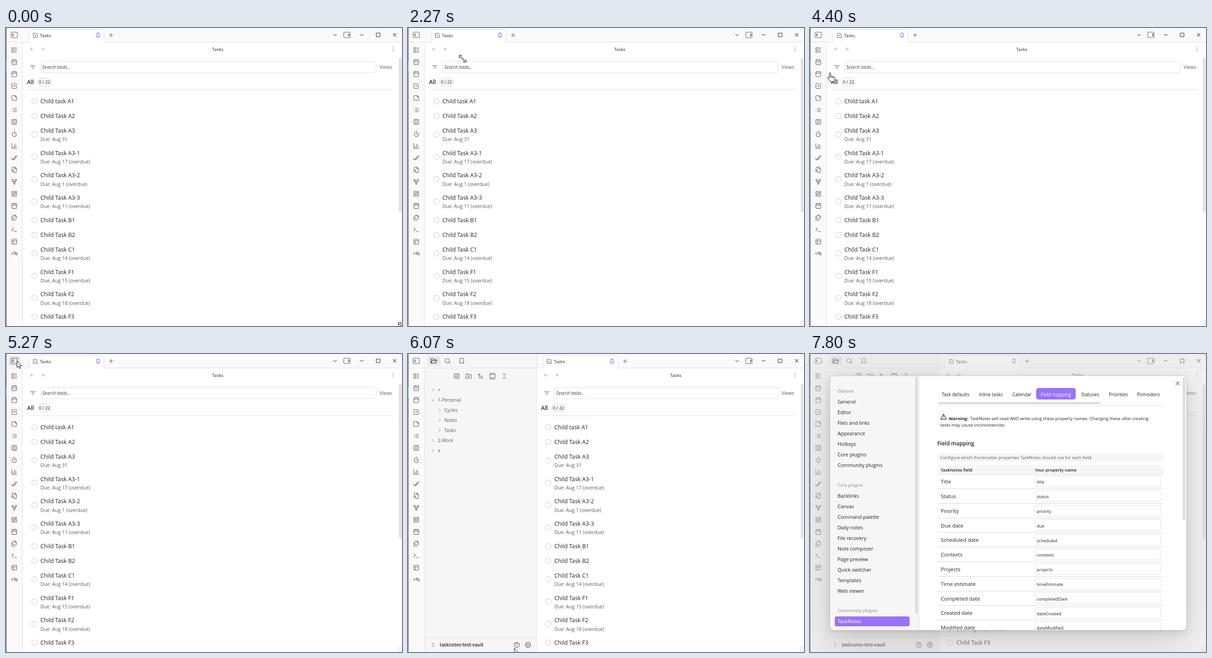
These frames come from a looping animation (863 by 649 pixels, 8 s). An HTML page with a canvas:

```html
<!DOCTYPE html>
<html lang="en">
<head>
<meta charset="utf-8">
<title>Tasks</title>
<style>
  html, body { margin: 0; width: 100%; height: 100%; overflow: hidden; background: #fff; }
  canvas { display: block; width: 863px; height: 649px; }
</style>
</head>
<body>
<canvas id="stage"></canvas>
<script>
const W = 863, H = 649, LOOP = 8000, FPS = 15, SIDEBAR = 244;
const INK = '#222', MUTED = '#5c5c5c', FAINT = '#b3b3b3', LINE = '#e0e0e0';
const CHROME = '#fafafa', PANEL = '#f6f6f6', ACCENT = '#9873f7', HOVER = '#e6e6e6', BAR = '#dedede';

const canvas = document.getElementById('stage');
const dpr = window.devicePixelRatio || 1;
canvas.width = W * dpr;
canvas.height = H * dpr;
const ctx = canvas.getContext('2d');

const clamp = v => Math.max(0, Math.min(1, v));
const smooth = v => (v = clamp(v), v * v * (3 - 2 * v));

// Icon path pieces on a 24-unit grid
const ring = (x, y, r) => `M${x - r} ${y}a${r} ${r} 0 1 0 ${2 * r} 0a${r} ${r} 0 1 0 ${-2 * r} 0`;
const box = (x, y, w, h, r = 1.5) =>
  `M${x + r} ${y}h${w - 2 * r}a${r} ${r} 0 0 1 ${r} ${r}v${h - 2 * r}a${r} ${r} 0 0 1 ${-r} ${r}` +
  `h${2 * r - w}a${r} ${r} 0 0 1 ${-r} ${-r}v${2 * r - h}a${r} ${r} 0 0 1 ${r} ${-r}z`;
const frame = box(3, 3, 18, 18, 2);
const calendar = box(3, 4, 18, 18, 2) + 'M16 2v4M8 2v4M3 10h18';
const gear = () => {
  let d = ring(12, 12, 3);
  for (let i = 0; i <= 32; i++) {
    const a = i * Math.PI / 16, r = i % 4 < 2 ? 10.5 : 8;
    d += `${i ? 'L' : 'M'}${12 + r * Math.cos(a)} ${12 + r * Math.sin(a)}`;
  }
  return d;
};

const icons = {
  list2: box(3, 3, 7, 7, 1) + box(3, 14, 7, 7, 1) + 'M14 4h7M14 9h7M14 15h7M14 20h7',
  days: calendar + 'M8 14h.01M12 14h.01M16 14h.01M8 18h.01M12 18h.01M16 18h.01',
  calendar,
  check: 'M9 11l3 3L22 4M21 12v7a2 2 0 0 1-2 2H5a2 2 0 0 1-2-2V5a2 2 0 0 1 2-2h11',
  note: 'M15 3H5a2 2 0 0 0-2 2v14a2 2 0 0 0 2 2h14a2 2 0 0 0 2-2V9ZM15 3v4a2 2 0 0 0 2 2h4',
  list: 'M8 6h13M8 12h13M8 18h13M3 6h.01M3 12h.01M3 18h.01',
  columns: frame + 'M9 3v18M15 3v18',
  timer: ring(12, 14, 8) + 'M10 2h4M12 14l3-3',
  chart: 'M3 3v18h18M8 17v-3M13 17V5M18 17V9',
  ticks: 'M1 14l5 6L18 4M11 19L23 4M8 16l3 3',
  fileSearch: 'M4 9V4a2 2 0 0 1 2-2h9l5 5v13a2 2 0 0 1-2 2H11M14 2v6h6M8 18l2 3' + ring(6, 15, 3.5),
  fork: ring(12, 18, 3) + ring(6, 6, 3) + ring(18, 6, 3) + 'M18 9v2a1 1 0 0 1-1 1H7a1 1 0 0 1-1-1V9M12 12v3',
  dashboard: box(3, 3, 7, 8, 1) + box(14, 3, 7, 5, 1) + box(14, 12, 7, 9, 1) + box(3, 15, 7, 6, 1),
  files: 'M15 2H9a2 2 0 0 0-2 2v11a2 2 0 0 0 2 2h9a2 2 0 0 0 2-2V7ZM15 2v5h5M3 7v13a2 2 0 0 0 2 2h10',
  terminal: 'M3 17l6-6-6-6M12 19h9',
  layout: frame + 'M3 9h18M9 21V9',
  panel: box(1, 2.5, 22, 19, 3),
  pin: 'M12 17v6M7 3h10M8 3v7l-3 4v3h14v-3l-3-4V3',
  plus: 'M12 4v16M4 12h16',
  down: 'M5 9l7 7 7-7',
  right: 'M9 5l7 7-7 7',
  minus: 'M4 12h16',
  square: box(4, 4, 16, 16, 0.5),
  close: 'M5 5l14 14M19 5L5 19',
  back: 'M20 12H4M11 5l-7 7 7 7',
  forward: 'M4 12h16M13 5l7 7-7 7',
  dots: ring(12, 4, 1) + ring(12, 12, 1) + ring(12, 20, 1),
  filter: 'M2 6h20M6 12h12M10 18h4',
  folder: 'M2 20V5a1 1 0 0 1 1-1h6l2 3h9a1 1 0 0 1 1 1v3M2 20l4-9h17l-3 9z',
  search: ring(11, 11, 8) + 'M17 17l5 5',
  bookmark: 'M19 22l-7-5-7 5V4a2 2 0 0 1 2-2h10a2 2 0 0 1 2 2z',
  edit: 'M12 3H5a2 2 0 0 0-2 2v14a2 2 0 0 0 2 2h14a2 2 0 0 0 2-2v-7M18 2l4 4-9 10H8v-5z',
  folderPlus: 'M2 20V4h7l2 3h11v13zM12 10v6M9 13h6',
  sort: 'M3 8l4-4 4 4M7 4v16M12 12h4M12 16h7M12 20h10',
  gallery: box(2, 6, 20, 13, 1) + 'M2 2h20M2 23h20',
  collapse: 'M6 3l6 6 6-6M6 21l6-6 6 6',
  updown: 'M7 15l5 5 5-5M7 9l5-5 5 5',
  help: ring(12, 12, 10) + 'M9 9a3 3 0 1 1 4 3q-1 .5-1 2M12 17.5h.01',
  gear: gear(),
  warn: 'M12 3L2 21h20zM12 9v5M12 17.5h.01'
};
for (const k in icons) icons[k] = new Path2D(icons[k]);

function icon(name, x, y, size = 14, color = MUTED, weight = 1.05) {
  const s = size / 24;
  ctx.save();
  ctx.translate(x - size / 2, y - size / 2);
  ctx.scale(s, s);
  ctx.lineWidth = weight / s;
  ctx.lineCap = ctx.lineJoin = 'round';
  ctx.strokeStyle = color;
  ctx.stroke(icons[name]);
  ctx.restore();
}

// y is the middle of the capital letters; baselines sit on whole pixels
function text(s, x, y, size, color = INK, style = '', align = 'left') {
  ctx.font = `${style} ${size}px "Open Sans", "Noto Sans", sans-serif`;
  ctx.fillStyle = color;
  ctx.textAlign = align;
  ctx.fillText(s, x, Math.round(y + size * 0.36));
}

function rect(x, y, w, h, color) {
  ctx.fillStyle = color;
  ctx.fillRect(x, y, w, h);
}

function round(x, y, w, h, r, fill, stroke) {
  ctx.beginPath();
  ctx.roundRect(x, y, w, h, r);
  if (fill) { ctx.fillStyle = fill; ctx.fill(); }
  if (stroke) { ctx.strokeStyle = stroke; ctx.lineWidth = 1; ctx.stroke(); }
}

function clipped(x, y, w, h, r, draw) {
  ctx.save();
  ctx.beginPath();
  ctx.roundRect(x, y, w, h, r);
  ctx.clip();
  draw();
  ctx.restore();
}

const ribbon = ['list2', 'days', 'calendar', 'check', 'note', 'list', 'columns', 'timer', 'chart',
  'ticks', 'fileSearch', 'fork', 'dashboard', 'calendar', 'files', 'terminal', 'layout'];

let rowY = 159.5;
const tasks = [
  ['Child task A1'], ['Child Task A2'], ['Child Task A3', 'Aug 31'],
  ['Child Task A3-1', 'Aug 17 (overdue)'], ['Child Task A3-2', 'Aug 1 (overdue)'],
  ['Child Task A3-3', 'Aug 11 (overdue)'], ['Child Task B1'], ['Child Task B2'],
  ['Child Task C1', 'Aug 14 (overdue)'], ['Child Task F1', 'Aug 15 (overdue)'],
  ['Child Task F2', 'Aug 18 (overdue)'], ['Child Task F3']
].map(([name, due]) => {
  const row = { name, due, y: rowY, h: due ? 48.75 : 32 };
  rowY += row.h;
  return row;
});

function drawRibbon(glow) {
  rect(0, 0, W, 30, CHROME);
  rect(0, 30, 36, H, CHROME);
  rect(0, 30, W, 1, LINE);
  rect(35, 30, 1, H, LINE);
  if (glow) {
    ctx.globalAlpha = glow;
    round(6, 4, 25, 22, 4, HOVER);
    ctx.globalAlpha = 1;
  }
  icon('panel', 18, 15, 15);
  rect(14, 12, 2, 6, MUTED);
  ribbon.forEach((name, i) => icon(name, 18, 48 + i * 26.08));
  text('<%', 18, 491.5, 10.5, MUTED, '600', 'center');
  rect(0, 0, 1, H, '#4a4a4a');
  rect(0, 72, 1, 23, '#3b8fd0');
}

function drawSidebar(w, gearHover) {
  clipped(36, 0, w, H, 0, () => {
    rect(36, 0, SIDEBAR, H, PANEL);
    rect(36, 30, SIDEBAR, 1, LINE);
    round(43, 5, 27, 20, 4, HOVER);
    icon('folder', 56, 15, 14, INK);
    icon('search', 86, 15);
    icon('bookmark', 117, 15);
    ['edit', 'folderPlus', 'sort', 'gallery', 'collapse'].forEach((n, i) => icon(n, 106 + 26 * i, 48));
    [['+', 0], ['1-Personal', 0], ['Cycles', 1], ['Notes', 1], ['Tasks', 1], ['2-Work', 0], ['x', 0]]
      .forEach(([name, depth], i) => {
        const x = 55 + 14 * depth, y = 78.5 + 22 * i;
        icon(i === 1 ? 'down' : 'right', x, y, 9, '#999');
        text(name, x + 10, y, 10.1, MUTED);
      });
    rect(36, 616, SIDEBAR, 1, LINE);
    icon('updown', 55, 633.5, 11, '#8a8a8a');
    text('tasknotes-test-vault', 69, 633.5, 9.9, INK, '600');
    icon('help', 237, 633.5);
    if (gearHover) round(250, 623, 23, 21, 4, HOVER);
    icon('gear', 261.5, 633.5, 14, gearHover ? INK : MUTED);
  });
  rect(35 + w, 0, 1, H, LINE);
}

function drawMain(dx, hover) {
  rect(36 + dx, 31, W, H, '#fff');
  ctx.save();
  ctx.translate(dx, 0);
  round(50.5, 3.5, 163, 34, 6, '#fff', LINE);
  rect(46, 31, 180, 8, '#fff');
  icon('check', 64, 16, 12);
  text('Tasks', 74, 16.5, 9.6);
  icon('pin', 200.5, 16, 13, '#8a5cf5');
  icon('plus', 229, 15.5, 12);
  icon('back', 57, 46, 11, FAINT);
  icon('forward', 80, 46, 11, FAINT);
  icon('filter', 58.5, 85, 13);
  text('Search tasks...', 79, 85.5, 10, '#444', 'italic');
  text('All', 46, 118, 12, INK, '600');
  round(68.5, 108.5, 31, 18, 9, PANEL, LINE);
  text('0 / 22', 84, 118, 9.4, INK, '500', 'center');
  ctx.restore();

  text('Tasks', 461.5 + dx / 2, 46, 9.8, INK, '', 'center');
  round(75.5 + dx, 72.5, 731 - dx, 25, 4, null, LINE);
  rect(46 + dx, 134, 799 - dx, 1, LINE);
  text('Views', 814, 85.5, 10.4, MUTED);

  tasks.forEach((t, i) => {
    if (i === hover) {
      rect(46 + dx, t.y - 14.5, 799 - dx, t.h - 3.5, '#f5f1fe');
      icon('dots', 832, t.y - 1.5 + (t.due ? 8 : 0), 9, '#777', 0.7);
    }
    ctx.beginPath();
    ctx.arc(62 + dx, t.y + (t.due ? 8.2 : 0), 5.9, 0, 7);
    ctx.lineWidth = 1.4;
    ctx.strokeStyle = '#d8d8d8';
    ctx.stroke();
    text(t.name, 75 + dx, t.y, 12.3);
    if (t.due) text('Due: ' + t.due, 75 + dx, t.y + 18.8, 10.5, MUTED);
  });

  icon('down', 717, 15, 11);
  icon('panel', 743, 15, 15);
  rect(746, 12, 2, 6, MUTED);
  icon('minus', 775, 15, 11, INK);
  icon('square', 811, 15, 12, INK);
  icon('close', 847, 15, 11, INK);
  icon('dots', 843.5, 46, 11, MUTED, 0.9);
  round(856, 65, 6, 337, 3, '#e2e2e2');
  round(854.5, 636.5, 14, 18, 5, PANEL, LINE);
}

const navs = [
  ['Options', 80.5, ['General', 'Editor', 'Files and links', 'Appearance', 'Hotkeys', 'Core plugins', 'Community plugins']],
  ['Core plugins', 285.5, ['Backlinks', 'Canvas', 'Command palette', 'Daily notes', 'File recovery', 'Note composer',
    'Page preview', 'Quick switcher', 'Templates', 'Web viewer']],
  ['Community plugins', 558.5, ['TaskNotes']]
];
const tabs = [['Task defaults', 287], ['Inline tasks', 368], ['Calendar', 441], ['Field mapping', 503],
  ['Statuses', 591], ['Priorities', 651], ['Pomodoro', 713]];
const fields = [['Title', 'title'], ['Status', 'status'], ['Priority', 'priority'], ['Due date', 'due'],
  ['Scheduled date', 'scheduled'], ['Contexts', 'contexts'], ['Projects', 'projects'],
  ['Time estimate', 'timeEstimate'], ['Completed date', 'completedDate'],
  ['Created date', 'dateCreated'], ['Modified date', 'dateModified']];

function modalBody() {
  rect(44, 48, 194, 553, PANEL);
  rect(237, 48, 1, 553, LINE);
  round(229, 50, 6, 516, 3, BAR);
  round(54, 571.5, 163, 21.5, 4, ACCENT);
  for (const [head, y, items] of navs) {
    text(head, 60, y, 9.3, '#a0a0a0', '600');
    items.forEach((s, i) => text(s, 60, y + 23.8 + 23 * i, 10.8, s === 'TaskNotes' ? '#fff' : INK));
  }

  round(812, 51, 6, 311, 3, BAR);
  icon('close', 801, 64, 13, MUTED);
  round(493, 74, 86, 25, 5, ACCENT);
  for (const [s, x] of tabs) text(s, x, 88, 10, s === 'Field mapping' ? '#fff' : INK);
  round(279, 104.5, 354, 5, 2.5, BAR);
  rect(278, 112, 493, 1, LINE);

  icon('warn', 291, 136.5, 15, INK);
  text('Warning:', 302, 140.5, 9.6, INK, '700');
  text('TaskNotes will read AND write using these property names. Changing these after creating', 349, 140.5, 9.4);
  text('tasks may cause inconsistencies.', 284, 154.5, 9.4);
  text('Field mapping', 277.5, 195, 11.8, INK, '600');
  round(278, 216, 493, 19, 4, PANEL);
  text('Configure which frontmatter properties TaskNotes should use for each field.', 284, 226, 9.4, MUTED);
  rect(278, 242, 493, 20, PANEL);
  rect(278, 262, 493, 1, LINE);
  text('TaskNotes field', 285, 252.5, 9.4, INK, '600');
  text('Your property name', 490, 252.5, 9.4, INK, '600');
  fields.forEach(([label, key], i) => {
    const y = 278 + 31.8 * i;
    text(label, 285, y, 11.5);
    round(490.5, Math.round(y) - 12.5, 273, 24, 3, '#fff', LINE);
    text(key, 494, y + 1, 9.4);
    rect(278, Math.round(y + 15), 493, 1, '#d8d8d8');
  });
}

function drawModal(alpha) {
  ctx.globalAlpha = alpha;
  rect(0, 0, W, H, 'rgba(220,220,220,0.4)');
  ctx.save();
  for (const [dy, blur, a] of [[30, 90, 0.12], [6, 25, 0.11], [2, 7, 0.07]]) {
    ctx.shadowColor = `rgba(0,0,0,${a})`;
    ctx.shadowBlur = blur * dpr;
    ctx.shadowOffsetY = dy * dpr;
    round(44, 48, 776, 553, 8, '#fff');
  }
  ctx.restore();
  clipped(44, 48, 776, 553, 8, modalBody);
  round(43.5, 47.5, 777, 554, 8, null, '#cfcfcf');
  ctx.globalAlpha = 1;
}

const pointers = {
  resize: 'M-7.5-7.5H-2L-4-5.5 5.5 4 7.5 2V7.5H2L4 5.5-5.5-4-7.5-2Z',
  arrow: 'M0 0V14.5L3.4 11.4 5.7 16.6 7.9 15.6 5.7 10.6H10.3Z',
  grab: 'M-4 9L-6.5 4-8.5 1C-9-1-7-2-5.5 0L-4.5 1V-6C-4.5-8-2.2-8-2-6C-2-8.5 .5-9 .8-7C1.5-8.5 3.8-8 3.8-5.5' +
    'C5-6.5 6.8-5.5 6.8-3.5V3L5 9ZM-2-6V-1M.8-7V-1M3.8-5.5V-1',
  hand: 'M-2 1C-2-1 1.2-1 1.2 1V7C3 6 4.5 7 4.6 8C6 7.3 7.4 8 7.5 9C9 8.5 10 9.5 10 11V15L8 19H0L-3 14-5.5 11' +
    'C-6 9-4 8.5-2 11ZM1.2 7V11M4.6 8V11M7.5 9V11'
};
for (const k in pointers) pointers[k] = new Path2D(pointers[k]);

const looks = [[0, 'resize'], [40, 'arrow'], [47, 'grab'], [63, 'hand'], [69, 'arrow']];

// Each move: first tick, last tick, end point, optional bend point
const moves = [
  [5, 18, 288.5, 235.5],
  [18, 30, 149, 122],
  [31, 36, 100, 53, 128, 65],
  [43, 53, 120, 334, 113, 245],
  [58, 71, 24, 15, 45.5, 124],
  [79, 91, 232, 641],
  [91, 98, 259, 630]
];

function pointerAt(n) {
  let x = 863, y = 649;
  for (const [from, to, ex, ey, bx = (x + ex) / 2, by = (y + ey) / 2] of moves) {
    if (n <= from) break;
    const s = smooth((n - from) / (to - from)), r = 1 - s;
    x = r * r * x + 2 * r * s * bx + s * s * ex;
    y = r * r * y + 2 * r * s * by + s * s * ey;
  }
  return [Math.round(x), Math.round(y)];
}

function drawPointer(n, alpha) {
  const path = pointers[looks.filter(([at]) => n >= at).pop()[1]];
  ctx.save();
  ctx.globalAlpha = alpha;
  ctx.translate(...pointerAt(n));
  ctx.fillStyle = '#fff';
  ctx.strokeStyle = '#000';
  ctx.lineWidth = 1;
  ctx.lineJoin = 'round';
  ctx.fill(path);
  ctx.stroke(path);
  ctx.restore();
}

function hoverRow(n) {
  if (n < 48 || n > 59) return -1;
  return n < 51 ? 0 : n < 52 ? 2 : 4;
}

function render(ms) {
  const n = Math.floor((ms + 4) * FPS / 1000);
  const open = SIDEBAR * smooth((n - 80) / 4);
  const glow = n < 84 ? clamp((n - 71) / 5) : 0;
  const modal = clamp((n - 112) / 4);

  ctx.setTransform(dpr, 0, 0, dpr, 0, 0);
  rect(0, 0, W, H, '#fff');
  drawRibbon(glow);
  drawMain(open, hoverRow(n));
  if (open) drawSidebar(open + 1, n >= 100 && modal < 1);
  if (modal) drawModal(modal);
  if (modal < 1) drawPointer(n, 1 - modal);
}

const start = performance.now();
function tick() {
  render((performance.now() - start) % LOOP);
  requestAnimationFrame(tick);
}
tick();
</script>
</body>
</html>
```
